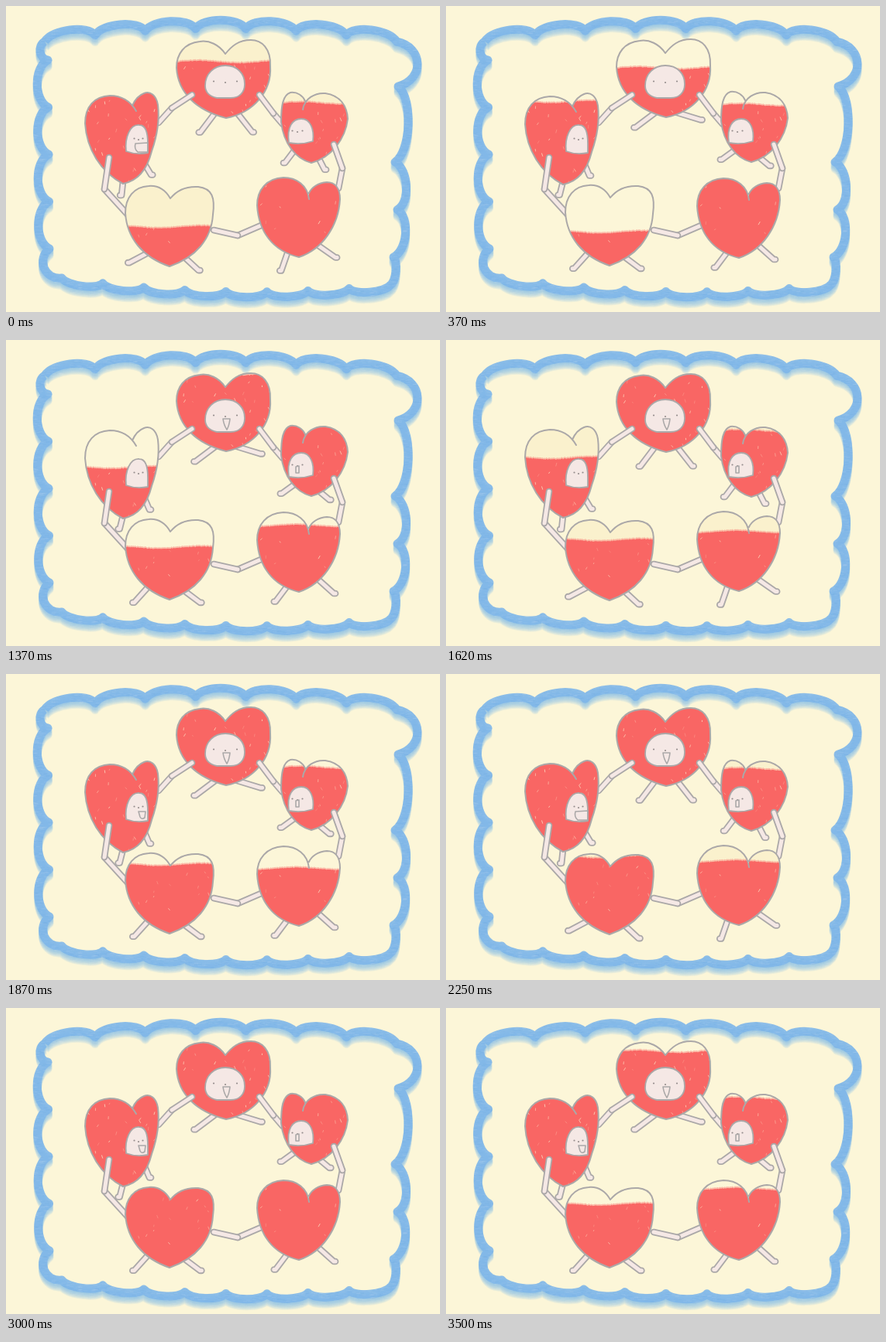
Animation, 560 px wide and 396 px high, one loop 3750 ms. Source, as an HTML page with a canvas:

```html
<!DOCTYPE html>
<html lang="en">
<head>
<meta charset="utf-8">
<title>Dancing hearts</title>
<style>
html, body { margin: 0; width: 100%; height: 100%; overflow: hidden; background: #fcf6d8; }
canvas { display: block; }
</style>
</head>
<body>
<canvas id="stage" width="560" height="396"></canvas>
<script>
const W = 560, H = 396, LOOP = 3750, STEPS = 14;
const PAPER = '#fcf6d8', TINT = '#faf1cd', RED = '#f96664', GREY = '#aba8a8', SKIN = '#f5e8e5', BLUE = '#7fb6e9';
const ctx = document.getElementById('stage').getContext('2d');

function seeded(seed) {
  return () => (seed = (seed * 16807) % 2147483647) / 2147483647;
}

// Sides of the frame, clockwise: start, number of scallops, their depth, bow of the side.
const sides = [
  { x: 50, y: 46, n: 7, depth: 11, bow: 17 },
  { x: 504, y: 46, n: 1, depth: 26, bow: 0 },
  { x: 506, y: 104, n: 1, depth: 15, bow: 0 },
  { x: 502, y: 202, n: 2, depth: 13, bow: 4 },
  { x: 500, y: 325, n: 1, depth: 5, bow: 0 },
  { x: 496, y: 361, n: 8, depth: 7, bow: 13 },
  { x: 72, y: 352, n: 1, depth: 16, bow: 0 },
  { x: 56, y: 314, n: 4, depth: 14, bow: 0 },
  { x: 54, y: 70, n: 1, depth: 8, bow: 0 }
];

function scallopPath() {
  const path = new Path2D();
  let { x, y } = sides[0];
  path.moveTo(x, y);
  sides.forEach((s, i) => {
    const end = sides[(i + 1) % sides.length];
    const dx = end.x - s.x, dy = end.y - s.y, len = Math.hypot(dx, dy);
    const nx = dy / len, ny = -dx / len;
    for (let k = 1; k <= s.n; k++) {
      const u = k / s.n, bow = 4 * u * (1 - u) * s.bow, out = s.depth * 4 / 3;
      const ex = s.x + dx * u + nx * bow, ey = s.y + dy * u + ny * bow;
      const ix = (ex - x) * 0.15, iy = (ey - y) * 0.15;
      path.bezierCurveTo(x + ix + nx * out, y + iy + ny * out, ex - ix + nx * out, ey - iy + ny * out, ex, ey);
      x = ex;
      y = ey;
    }
  });
  return path;
}

// Crayon band: crisp above, fading downwards, with paper grain.
function makeBorder() {
  const layer = document.createElement('canvas');
  layer.width = W;
  layer.height = H;
  const c = layer.getContext('2d'), rnd = seeded(77), path = scallopPath();
  c.strokeStyle = BLUE;
  c.lineWidth = 11;
  c.lineJoin = 'round';
  for (let d = 9; d >= 0; d--) {
    c.globalAlpha = d ? 0.13 : 0.9;
    c.setTransform(1, 0, 0, 1, 0, d);
    c.stroke(path);
  }
  c.globalCompositeOperation = 'source-atop';
  for (let i = 0; i < 16000; i++) {
    c.globalAlpha = 0.2;
    c.fillStyle = rnd() < 0.5 ? '#a9cfee' : '#62a3e2';
    c.fillRect(rnd() * W, rnd() * H, 5, 1);
  }
  return layer;
}

// waves: dips of the red level as [first step, length, depth, skew].
// legs: [hip x, hip y, angle from straight down, turn on the odd beat].
const hearts = [
  {
    shape: 'M283 62C275 50 262 44 250 46C230 48 220 62 220 80C222 112 245 135 284 145C320 138 343 110 341 78C342 55 330 44 316 44C300 44 291 52 283 62',
    x: 220, top: 45, lift: -1, specks: 50, waves: [[12.3, 6.7, 38, 1]],
    leg: 32, legs: [[270, 138, -37, -16], [298, 138, 38, 35]],
    face: 'M257 103C257 88 268 77 283 77C298 77 308 87 308 101C308 112 301 119 290 119L272 119C263 117 257 113 257 103',
    eyes: [283, 98, 15], sings: s => s > 4,
    mouth: 'M280 102L289 102Q288 111 285 116Q281 110 280 102Z'
  },
  {
    shape: 'M168 136C160 122 148 116 134 116C114 117 102 130 102 152C104 185 122 215 151 230C172 226 183 208 188 188C196 165 198 145 196 128C194 115 186 110 178 113C170 116 166 122 163 129',
    x: 100, top: 120, lift: 1, specks: 50, waves: [[0, 7, 44, 2]],
    leg: 18, legs: [[151, 227, -6, -8], [178, 203, 31, -8]],
    face: 'M155 188C153 170 160 153 172 154C180 154 183 165 183 178L183 190Q168 193 155 188',
    eyes: [171, 172, 5.5], sings: s => s > 6 || s < 1,
    mouth: 'M171 178L180 178L179 186Q175 189 173 185Z',
    wide: 'M167 178L183 177L183 189L170 189Q165 185 167 178'
  },
  {
    shape: 'M383 134C385 120 398 112 412 113C432 116 440 130 441 146C438 172 420 196 394 203C374 198 358 178 355 150C355 130 357 115 367 112C376 111 383 116 386 123',
    x: 340, top: 111, lift: -1, specks: 40, waves: [[12, 5, 18, 1.3], [5, 5.5, 12, 1]],
    leg: 20, legs: [[372, 187, -37, -17], [402, 194, 27, 23]],
    face: 'M365 177C362 156 370 146 381 146C393 146 398 160 396 175Q381 180 365 177',
    eyes: [376, 162, 6.5], sings: s => s > 2,
    mouth: 'M374 164L378 163L378 172L374 172Z'
  },
  {
    shape: 'M212 249C205 237 195 232 184 233C165 234 154 248 154 268C156 300 176 325 211 337C245 325 265 302 267 270C270 248 266 236 248 234C232 233 220 239 212 249',
    x: 150, top: 226, lift: -1, specks: 20, waves: [[12.8, 10.2, 68, 0.5]],
    leg: 28, legs: [[184, 319, -62, 20], [228, 323, 47, 6]]
  },
  {
    shape: 'M391 250C389 232 375 222 358 222C336 223 324 238 324 258C326 292 344 317 378 325C408 315 429 285 431 250C431 236 425 228 414 228C402 229 394 235 391 242',
    x: 320, top: 224, lift: 1, specks: 10, waves: [[3, 6, 27, 1.5], [12, 2, 9, 1]],
    leg: 27, legs: [[364, 317, -19, -18], [403, 310, 55, -7]]
  }
];
for (const h of hearts) {
  for (const key of ['shape', 'face', 'mouth', 'wide']) if (h[key]) h[key] = new Path2D(h[key]);
}

// Joined hands: near shoulder, hands, far shoulder.
const arms = [
  [240, 115, 214, 132, 197, 151],
  [327, 115, 345, 139, 357, 153],
  [133, 196, 127, 237, 157, 270],
  [268, 290, 299, 297, 329, 284],
  [423, 179, 434, 210, 429, 236]
];

function levelOf(h, step) {
  for (const [start, len, depth, skew] of h.waves) {
    const u = ((step - start + STEPS) % STEPS) / len;
    if (u > 0 && u < 1) return h.top + depth * Math.sin(Math.PI * u ** skew);
  }
  return 0;
}

function outline(path, width) {
  ctx.strokeStyle = GREY;
  ctx.lineWidth = width;
  ctx.stroke(path);
}

function limb(x1, y1, x2, y2, foot = 0) {
  const path = new Path2D();
  path.moveTo(x1, y1);
  path.lineTo(x2, y2);
  path.lineTo(x2 + foot, y2);
  ctx.lineCap = ctx.lineJoin = 'round';
  outline(path, 8.6);
  ctx.strokeStyle = SKIN;
  ctx.lineWidth = 5;
  ctx.stroke(path);
}

function drawLegs(h, odd) {
  for (const [x, y, angle, turn] of h.legs) {
    const a = (angle + odd * turn) * Math.PI / 180;
    limb(x, y, x + Math.sin(a) * h.leg, y + Math.cos(a) * h.leg, Math.sign(a) * 2);
  }
}

function drawBody(h, step, seed) {
  const size = 122, level = levelOf(h, step), rnd = seeded(seed);
  ctx.save();
  ctx.translate(0, step % 2 * h.lift);
  ctx.save();
  ctx.clip(h.shape);
  ctx.fillStyle = step % 2 ? PAPER : TINT;
  ctx.fillRect(h.x, h.top - 15, size, size + 15);
  ctx.fillStyle = RED;
  for (let i = 0; i < size; i++) {
    const edge = level + 1.5 * Math.sin(i / 17 + seed) + rnd();
    ctx.globalAlpha = 0.4;
    ctx.fillRect(h.x + i, edge - 2, 1, 3);
    ctx.globalAlpha = 1;
    ctx.fillRect(h.x + i, edge, 1.5, H);
  }
  // Bare flecks in the crayon
  ctx.strokeStyle = '#fddcc0';
  ctx.lineWidth = 1;
  for (let i = 0; i < h.specks; i++) {
    const x = h.x + rnd() * size, y = h.top + rnd() * size;
    ctx.globalAlpha = 0.2 + rnd() * 0.6;
    ctx.beginPath();
    ctx.moveTo(x, y);
    ctx.lineTo(x + rnd() * 4 - 2, y + 1 + rnd() * 3);
    if (y > level + 2) ctx.stroke();
  }
  ctx.restore();
  outline(h.shape, 2);
  ctx.restore();
}

function drawFace(h, step) {
  const [x, y, gap] = h.eyes;
  ctx.fillStyle = SKIN;
  ctx.fill(h.face);
  outline(h.face, 1.8);
  ctx.fillStyle = '#968e8e';
  for (const side of [-1, 0, 1]) {
    ctx.beginPath();
    ctx.arc(x + side * gap, y + (side ? -0.5 : 1), 1.1, 0, 7);
    ctx.fill();
  }
  if (h.sings(step)) outline(step % 2 ? h.mouth : h.wide || h.mouth, 1.6);
}

// Even beats, with a longer rest at the start and in the middle
function stepAt(t) {
  if (t < 370) return 0;
  if (t < 2250) return Math.min(7, 1 + Math.floor((t - 370) / 250));
  return 8 + Math.floor((t - 2250) / 250);
}

const border = makeBorder();
let shown = -1;

function draw(step) {
  ctx.fillStyle = PAPER;
  ctx.fillRect(0, 0, W, H);
  ctx.drawImage(border, 0, 0);
  for (const h of hearts) drawLegs(h, step % 2);
  for (const [, , hx, hy, x, y] of arms) limb(hx, hy, x, y);
  hearts.forEach((h, i) => {
    drawBody(h, step, 311 + i * 97);
    if (h.face) drawFace(h, step);
  });
  for (const [x, y, hx, hy] of arms) limb(x, y, hx, hy);
}

function tick() {
  const step = stepAt(performance.now() % LOOP);
  if (step !== shown) draw(shown = step);
  requestAnimationFrame(tick);
}
tick();
</script>
</body>
</html>
```
